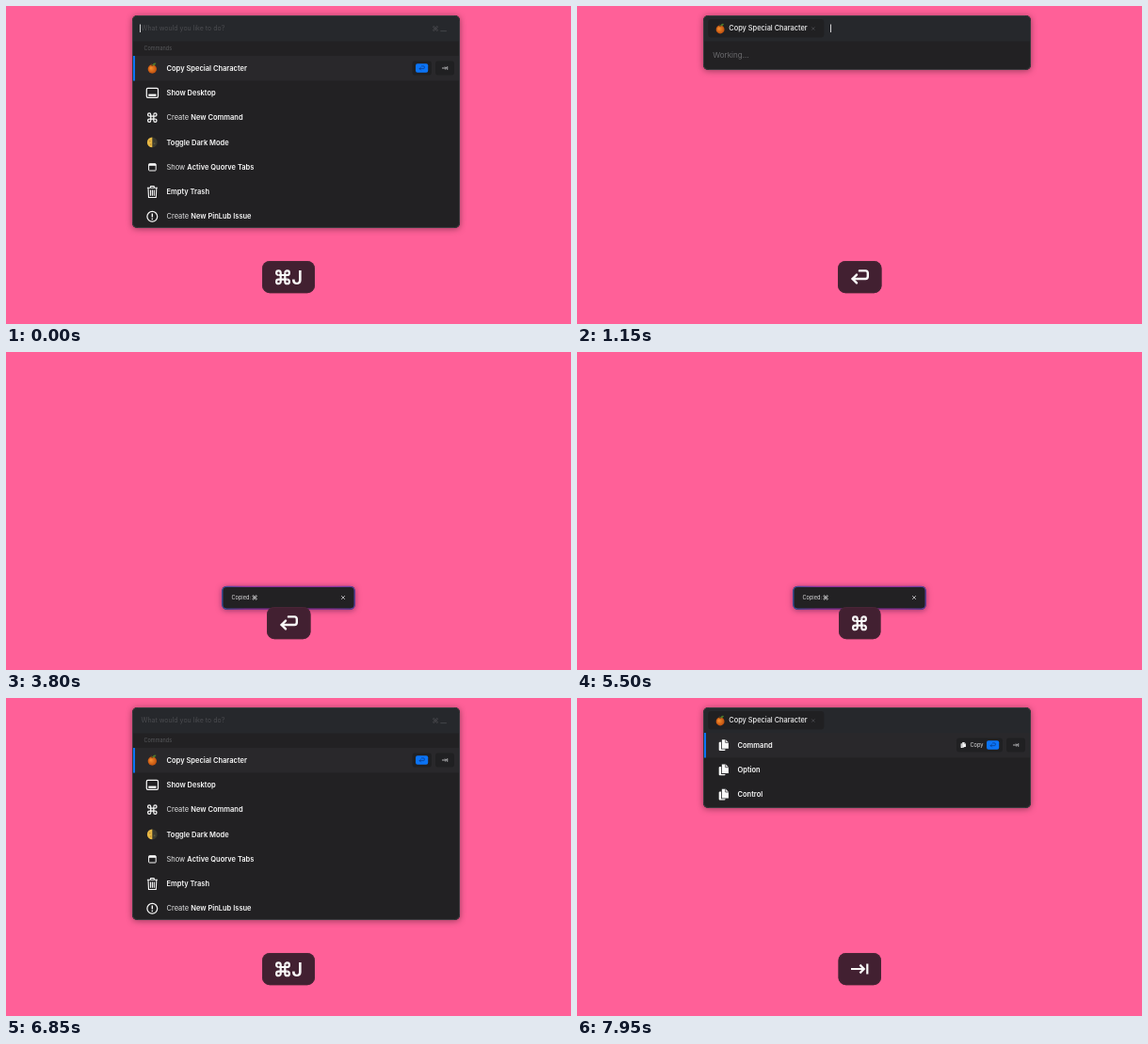
An HTML page with a canvas for the animation above (8 s loop, 600x338 px).

```html
<!DOCTYPE html>
<html lang="en">
<head>
<meta charset="utf-8">
<title>Command launcher</title>
<style>
html, body { margin: 0; width: 100%; height: 100%; overflow: hidden; background: #ff6098; }
canvas { display: block; width: 600px; height: 338px; }
</style>
</head>
<body>
<canvas id="stage"></canvas>
<script>
const canvas = document.getElementById('stage');
const c = canvas.getContext('2d');
const ratio = window.devicePixelRatio || 1;
canvas.width = 600 * ratio;
canvas.height = 338 * ratio;

const LOOP = 8000;
const REPEAT = 6100;
const ROW = 26.3;
const PINK = '#ff6098', BODY = '#222123', HEAD = '#26282c', ACTIVE = '#29282b';
const CHIP = '#202022', BLUE = '#0b74f6', WHITE = '#f8f8f8', DIM = '#4b4c50';

function box(x, y, w, h, r, fill) {
  c.beginPath();
  c.roundRect(x, y, w, h, r);
  c.fillStyle = fill;
  c.fill();
}

function rect(x, y, w, h, fill) {
  c.fillStyle = fill;
  c.fillRect(x, y, w, h);
}

function disc(x, y, r, fill) {
  c.beginPath();
  c.arc(x, y, r, 0, 7);
  c.fillStyle = fill;
  c.fill();
}

function outline(x, y, w, h, r, color, width) {
  c.beginPath();
  c.roundRect(x, y, w, h, r);
  c.strokeStyle = color;
  c.lineWidth = width;
  c.stroke();
}

function text(s, x, y, size, color, weight = 400) {
  c.font = `${weight} ${size}px Inter, "Liberation Sans", sans-serif`;
  c.fillStyle = color;
  c.fillText(s, x, y);
  return c.measureText(s).width;
}

// Run a drawing routine around a local origin.
function at(x, y, scale, draw) {
  c.save();
  c.translate(x, y);
  c.scale(scale, scale);
  draw();
  c.restore();
}

function lines(color, width, ...paths) {
  c.strokeStyle = color;
  c.lineWidth = width;
  c.beginPath();
  for (const p of paths) {
    for (let i = 0; i < p.length; i += 2) {
      if (i) c.lineTo(p[i], p[i + 1]);
      else c.moveTo(p[i], p[i + 1]);
    }
  }
  c.stroke();
}

function cross(x, y, r, color, width) {
  lines(color, width, [x - r, y - r, x + r, y + r], [x + r, y - r, x - r, y + r]);
}

// Looped square, 16 units wide.
function loopSign(x, y, scale, color, width = 2.2) {
  at(x, y, scale, () => {
    const a = 2.3, r = 2.3;
    c.strokeStyle = color;
    c.lineWidth = width;
    for (let i = 0; i < 4; i++) {
      c.beginPath();
      c.moveTo(a, -a - r);
      c.lineTo(a, a + r);
      c.arc(a + r, a + r, r, Math.PI, -Math.PI / 2, true);
      c.stroke();
      c.rotate(Math.PI / 2);
    }
  });
}

function returnSign(x, y, scale, color) {
  at(x, y, scale, () => {
    c.lineCap = c.lineJoin = 'round';
    c.strokeStyle = color;
    c.lineWidth = 2.4;
    c.beginPath();
    c.moveTo(-.5, -6.6);
    c.lineTo(6, -6.6);
    c.quadraticCurveTo(8.4, -6.6, 8.4, -4.2);
    c.lineTo(8.4, -.4);
    c.quadraticCurveTo(8.4, 2, 6, 2);
    c.lineTo(-7.8, 2);
    c.stroke();
    lines(color, 2.4, [-3.4, -2.4, -7.8, 2, -3.4, 6.4]);
  });
}

function tabSign(x, y, scale, color) {
  at(x, y, scale, () => {
    lines(color, 2.2, [-9, 0, 4.2, 0], [.4, -4.4, 4.8, 0, .4, 4.4], [8.3, -5.5, 8.3, 5.5]);
  });
}

const icons = {
  orange() {
    const g = c.createRadialGradient(-1.5, 0, .5, 0, 1, 5);
    g.addColorStop(0, '#f58a2c');
    g.addColorStop(1, '#b94b0c');
    disc(0, 1, 4.7, g);
    c.fillStyle = '#4d7a2b';
    c.beginPath();
    c.moveTo(0, -2.6);
    c.quadraticCurveTo(1, -6.6, 4.2, -5.2);
    c.quadraticCurveTo(3.4, -2.4, 0, -2.6);
    c.fill();
    lines('#4c3a20', .9, [0, -2, -1, -5]);
  },
  desktop() {
    outline(-6, -5, 12.2, 10, 1.4, WHITE, 1.2);
    rect(-4, 1.3, 8.2, 2.2, WHITE);
  },
  loop() { loopSign(0, 0, .68, WHITE, 1.9); },
  moon() {
    disc(0, 0, 5.4, '#39392f');
    c.fillStyle = '#e8b845';
    c.beginPath();
    c.arc(0, 0, 5.4, Math.PI / 2, -Math.PI / 2);
    c.fill();
    disc(-2.5, -1.3, .9, '#c18e31');
    disc(-1.6, 2.2, .8, '#c18e31');
    disc(2.3, 1.3, 1, '#59553d');
  },
  tabs() {
    outline(-3.7, -3.5, 7.6, 7.3, .8, WHITE, 1);
    rect(-3.7, -3.5, 7.6, 2.1, WHITE);
  },
  trash() {
    lines(WHITE, 1.1, [-5.4, -4.2, 5.6, -4.2], [-2, -4.4, -1.6, -6, 1.8, -6, 2.2, -4.4],
      [-4.3, -4, -3.8, 6, 4, 6, 4.5, -4],
      [-1.8, -2, -1.8, 4.2], [.1, -2, .1, 4.2], [2, -2, 2, 4.2]);
  },
  issue() {
    outline(-5.4, -5.4, 10.8, 10.8, 5.4, WHITE, 1.2);
    lines(WHITE, 1.4, [0, -3.2, 0, .8]);
    disc(0, 2.6, .8, WHITE);
  },
  copy() {
    box(-4.6, -3.2, 6.8, 9.2, 1, WHITE);
    const page = () => {
      c.beginPath();
      c.moveTo(-1.4, -5.8);
      c.lineTo(2.6, -5.8);
      c.lineTo(5.6, -2.8);
      c.lineTo(5.6, 3.8);
      c.lineTo(-1.4, 3.8);
      c.closePath();
    };
    page();
    c.strokeStyle = ACTIVE;
    c.lineWidth = 1.6;
    c.stroke();
    c.fillStyle = WHITE;
    c.fill();
    lines(ACTIVE, .7, [2.4, -5.8, 2.4, -2.6, 5.6, -2.6]);
  },
  piano() {
    rect(-4.3, -3.6, 8.6, 7.6, '#ececec');
    for (const x of [-2.2, 0, 2.2]) {
      rect(x - .7, -3.6, 1.4, 4.6, '#171719');
      rect(x - .15, 1, .3, 3, '#555');
    }
  }
};

// Each row: icon, light prefix, bold label.
const commands = [
  ['orange', '', 'Copy Special Character'],
  ['desktop', '', 'Show Desktop'],
  ['loop', 'Create ', 'New Command'],
  ['moon', '', 'Toggle Dark Mode'],
  ['tabs', 'Show ', 'Active Quorve Tabs'],
  ['trash', '', 'Empty Trash'],
  ['issue', 'Create ', 'New PinLub Issue']
];
const results = ['Command', 'Option', 'Control'].map(s => ['copy', '', s]);
const actions = ['Copy Character', 'Copy Hex'].map(s => ['copy', '', s]);

function rows(list, top) {
  rect(135, top - 13, 346, 26.5, ACTIVE);
  rect(135, top - 13, 2, 26.5, BLUE);
  list.forEach(([icon, light, bold], i) => {
    const y = top + i * ROW;
    at(155.3, y, 1, icons[icon]);
    const w = light ? text(light, 170.5, y + 2.6, 7.5, '#e4e4e5') : 0;
    text(bold, 170.5 + w, y + 2.6, 7.5, WHITE, 600);
  });
}

function enterHint(right, y, withCopy) {
  const w = withCopy ? 49 : 20.5;
  box(right - w, y - 7.5, w, 15, 3, CHIP);
  if (withCopy) {
    at(right - 42, y, .52, icons.copy);
    text('Copy', right - 34.6, y + 2, 5.7, '#dedee0');
  }
  box(right - 17, y - 4.8, 13.2, 9.6, 2, BLUE);
  returnSign(right - 10.4, y, .32, '#0a3c8c');
}

function tabHint(y) {
  box(456, y - 7.5, 20, 15, 3, CHIP);
  tabSign(466, y, .33, '#e8e8ea');
}

function chip(x, w, icon, label) {
  box(x, 14, w, 19.5, 3, CHIP);
  at(x + (icon === 'piano' ? 13.5 : 12.8), 24, .95, icons[icon]);
  text(label, x + 22, 26.4, 7.4, '#f0f0f1', 500);
  cross(x + w - 11.5, 24, 1.6, '#57585c', .7);
}

function windowFrame(bottom, contentBottom) {
  const h = bottom - 10;
  c.save();
  c.shadowColor = 'rgba(0,0,0,.4)';
  c.shadowBlur = 7;
  c.shadowOffsetY = 1;
  box(134, 10, 348, h, 5, BODY);
  c.restore();
  if (contentBottom < bottom) {
    box(134.5, 10.5, 347, h - 1, 5, PINK);
    box(134.5, 10.5, 347, contentBottom - 10.5, 5, BODY);
  }
  box(134.5, 10.5, 347, 27, [5, 5, 0, 0], HEAD);
}

function caret(x) { rect(x, 19.5, 1, 8.5, '#d5d5d7'); }

// Half a second on, half a second off, counted from the given start.
const blink = (t, start) => t >= start && (t - start) % 1000 < 500;

function launcher(t) {
  let bottom = 236, content = 236;
  if (t >= 2750) bottom = content = 90.5;
  else if (t >= 2500) [bottom, content] = [117, 90];
  else if (t >= 1250) bottom = content = 117;
  else if (t >= 850) bottom = content = 68;
  windowFrame(bottom, content);

  if (t < 850) {
    text('What would you like to do?', 143.5, 26.3, 7, DIM);
    loopSign(456, 24, .36, DIM, 1.9);
    rect(461.3, 26.3, 6.6, .8, DIM);
    text('Commands', 146.5, 46.5, 5.5, '#58595c');
    rows(commands, 66);
    enterHint(452, 66, false);
    tabHint(66);
    if (blink(t, -200)) caret(142);
  } else {
    chip(139.3, 123, 'orange', 'Copy Special Character');
    if (t < 1250) {
      text('Working...', 144.3, 54.8, 8, '#6b6b6e');
      if (blink(t, 850)) caret(269);
    } else if (t < 2500) {
      rows(results, 50);
      enterHint(452, 50, true);
      tabHint(50);
      if (blink(t, 1250)) caret(269);
    } else {
      chip(266, 76, 'piano', 'command');
      rows(actions, 50);
      enterHint(476, 50, true);
      if (blink(t, 2750)) caret(349);
    }
  }
  outline(134.5, 10.5, 347, bottom - 11, 5, '#3c3a3f', 1);
}

function toast(alpha) {
  c.save();
  c.globalAlpha = alpha;
  c.save();
  c.shadowColor = 'rgba(40,10,50,.5)';
  c.shadowBlur = 6;
  c.shadowOffsetY = 1;
  box(229.5, 249, 141, 24.5, 4.5, BODY);
  c.restore();
  const edge = c.createLinearGradient(229, 0, 371, 0);
  edge.addColorStop(0, '#34509a');
  edge.addColorStop(.18, '#8a2f9c');
  edge.addColorStop(.8, '#912f9d');
  edge.addColorStop(1, '#5b419f');
  outline(229.8, 249.3, 140.4, 23.8, 4.5, edge, 1.3);
  text('Copied:', 239.5, 263, 5.6, '#dededf');
  loopSign(264.1, 261, .33, '#dededf', 1.9);
  cross(358, 261, 1.9, '#d0d0d2', .8);
  c.restore();
}

const keys = {
  combo: [272, 56, () => {
    loopSign(294, 288.3, 1, WHITE);
    text('J', 303.2, 296, 20.5, WHITE, 600);
  }],
  enter: [277, 46.5, () => returnSign(300.4, 288, 1, WHITE)],
  tab: [277.5, 45.5, () => tabSign(300, 288, 1, WHITE)],
  loop: [278, 44.5, () => loopSign(300, 288.3, 1, WHITE)]
};

const presses = [[-200, 'combo'], [800, 'enter'], [1450, 'tab'], [3350, 'enter'], [5450, 'loop'], [5700, 'combo']];

function keyCap(t) {
  const [x, w, draw] = keys[presses.filter(p => p[0] <= t).pop()[1]];
  box(x, 271, w, 34.2, 8, '#422031');
  outline(x + .5, 271.5, w - 1, 33.2, 7.5, '#4d2839', .7);
  draw();
}

function render(now) {
  const time = now % LOOP;
  const t = time < 5900 ? time : time - REPEAT;
  c.setTransform(ratio, 0, 0, ratio, 0, 0);
  rect(0, 0, 600, 338, PINK);
  if (t < 3600) launcher(t);
  if (t >= 3650 && t < 5700) toast(Math.min(1, (t - 3600) / 200));
  keyCap(t);
}

const start = performance.now();
function tick() {
  render(performance.now() - start);
  requestAnimationFrame(tick);
}
tick();
</script>
</body>
</html>
```
